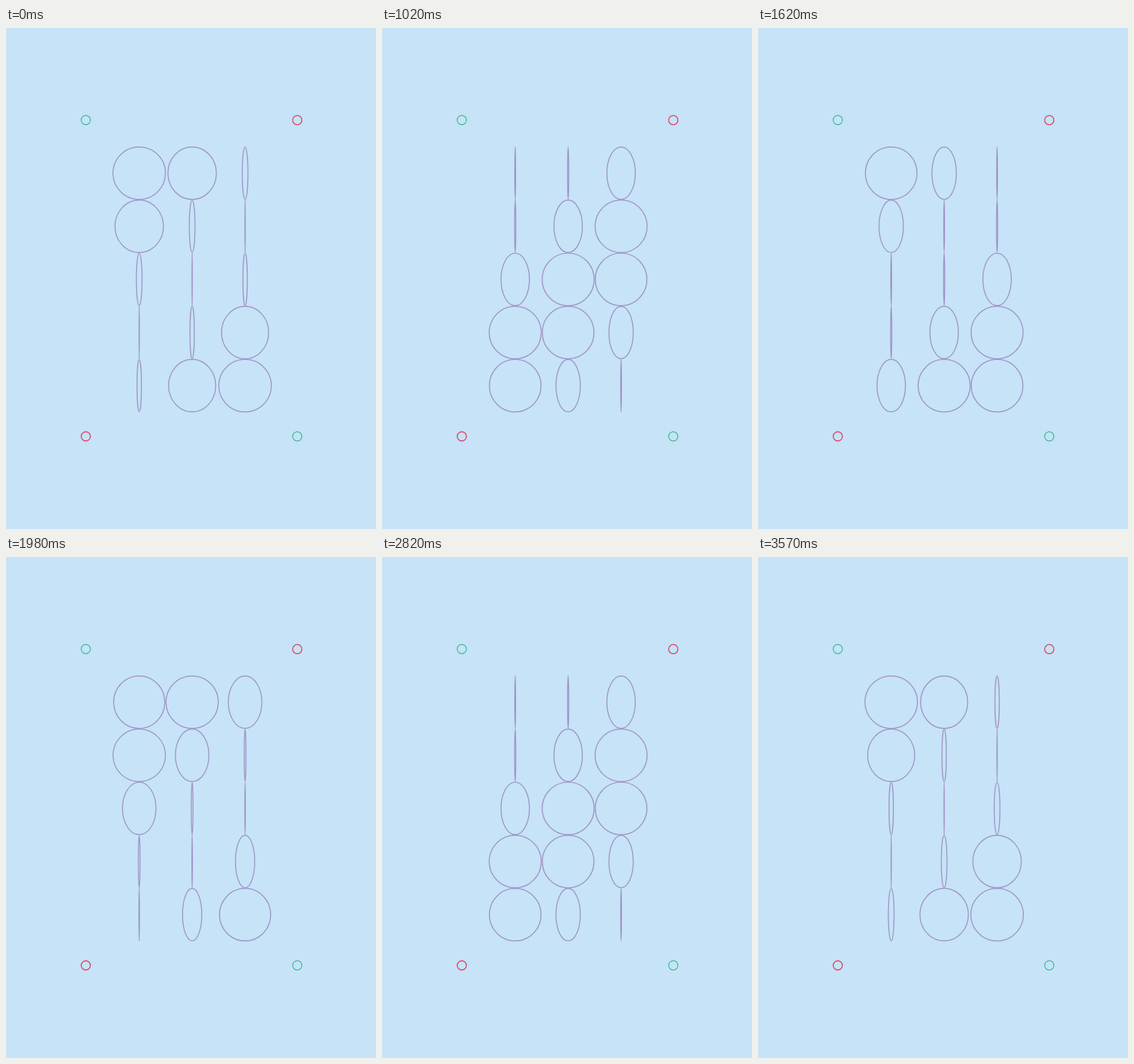
Animation of 643 by 871 pixels, one loop 3.6 s. Source, as an HTML page:

```html
<!DOCTYPE html>
<html lang="en">
<head>
<meta charset="utf-8">
<title>Turning circles</title>
<style>
  html, body { margin: 0; width: 100%; height: 100%; overflow: hidden; background: #c6e3f7; }
  svg { display: block; width: 643px; height: 871px; fill: none; }
  #grid { stroke: #a195c6; stroke-width: 1.7; }
  .green { stroke: #35b78c; stroke-width: 1.4; }
  .red { stroke: #e04866; stroke-width: 1.8; }
</style>
</head>
<body>
<svg viewBox="0 0 643 871">
  <circle class="green" cx="138.7" cy="160" r="8"/>
  <circle class="red" cx="506.2" cy="160.2" r="8"/>
  <circle class="red" cx="138.7" cy="710" r="8"/>
  <circle class="green" cx="506.2" cy="710" r="8"/>
  <g id="grid"></g>
</svg>
<script>
  const PERIOD = 1800, STAGGER = 300, TICK = 30;
  const COLS = 3, ROWS = 5, PITCH_X = 92, PITCH_Y = 92.35;
  const RADIUS = 45.6, THIN = 0.3;
  const EDGE = 0.383;
  const grid = document.getElementById('grid');
  const cells = [];

  for (let c = 0; c < COLS; c++) {
    for (let r = 0; r < ROWS; r++) {
      const el = document.createElementNS('http://www.w3.org/2000/svg', 'ellipse');
      el.setAttribute('cx', 231.5 + c * PITCH_X);
      el.setAttribute('cy', 252.4 + r * PITCH_Y);
      el.setAttribute('ry', RADIUS);
      grid.append(el);
      cells.push({ el, delay: (c + r) * STAGGER });
    }
  }

  // Symmetric ease: long slow tails with a quick middle.
  function ease(x) {
    if (x > 0.5) return 1 - ease(1 - x);
    if (x < EDGE) return 2.17 * x ** 2.9;
    const w = (0.5 - x) / (0.5 - EDGE);
    return 0.5 - (0.537 * w + 0.636 * w ** 3 - 0.441 * w ** 5) / 2;
  }

  function draw(time) {
    const t = Math.floor(time / TICK) * TICK + TICK / 2;
    for (const { el, delay } of cells) {
      const phase = (((t - delay) % PERIOD) + PERIOD) % PERIOD / PERIOD;
      const x = 1 - Math.abs(1 - 2 * phase);
      el.setAttribute('rx', (THIN + (RADIUS - THIN) * (1 - ease(x))).toFixed(2));
    }
  }

  const start = performance.now();
  function loop() {
    draw(performance.now() - start);
    requestAnimationFrame(loop);
  }
  draw(0);
  requestAnimationFrame(loop);
</script>
</body>
</html>
```
